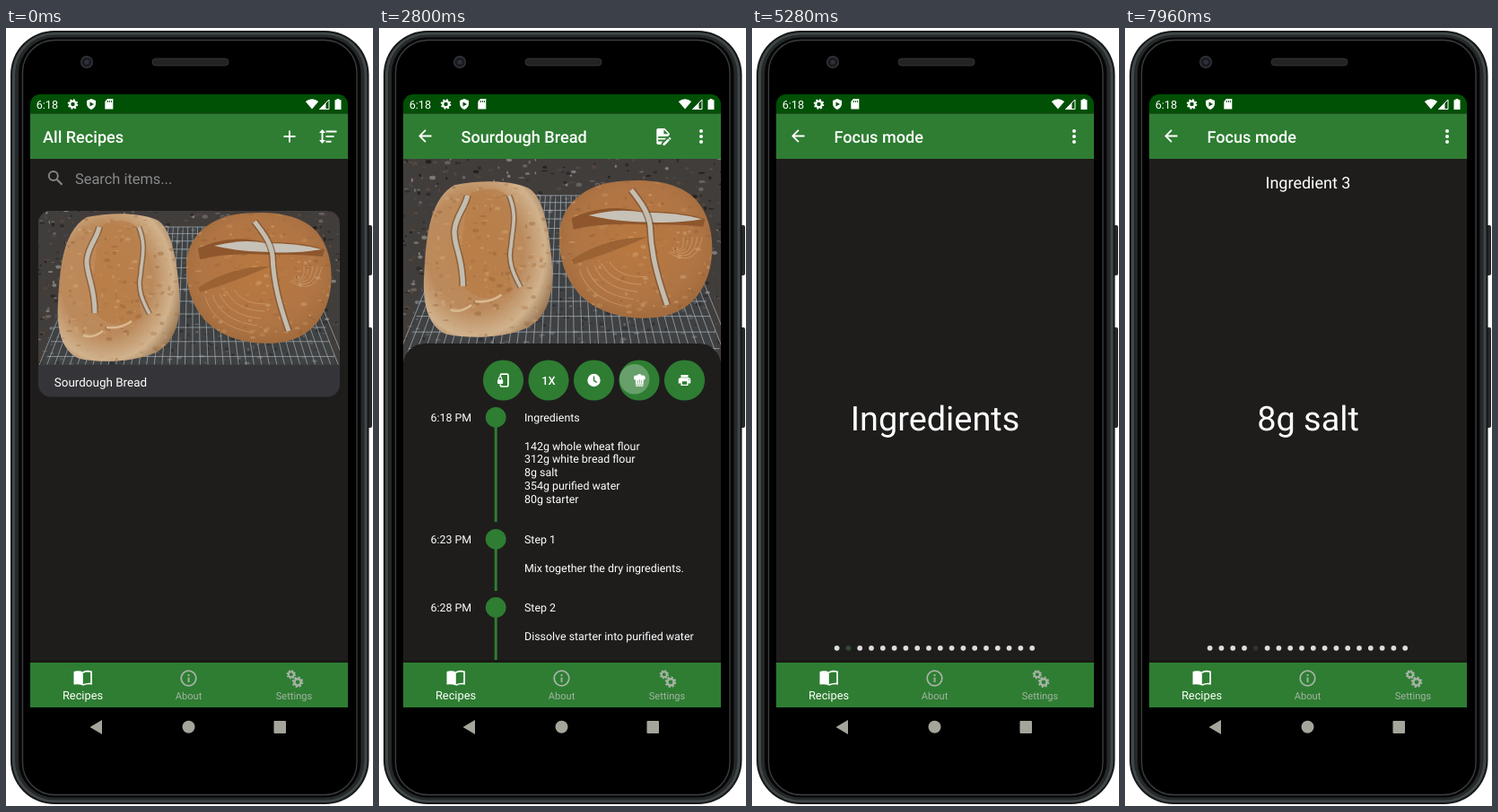
An HTML page that plays this animation: 409 px wide and 868 px high, repeating every 8 s.

```html
<!DOCTYPE html>
<html lang="en">
<head>
<meta charset="utf-8">
<title>Recipe app</title>
<style>
html, body { margin: 0; width: 100%; height: 100%; overflow: hidden; background: #fff; }
svg { display: block; width: 409px; height: 868px; font-family: Roboto, sans-serif; fill: #fff; }
text { text-rendering: geometricPrecision; white-space: pre; }
</style>
</head>
<body>
<svg id="stage" viewBox="0 0 409 868" xmlns="http://www.w3.org/2000/svg"></svg>
<script>
const LOOP = 8000, TICK = 66.9, PAGE_W = 328;
const GREEN = '#2e7d32', BODY = '#1e1d1c', MUTED = '#a5b3a5';

// Shape helpers
const attrs = o => Object.entries(o).map(([k, v]) => ` ${k}="${v}"`).join('');
const rect = (x, y, w, h, fill, rx = 0, more = {}) =>
  `<rect x="${x}" y="${y}" width="${w}" height="${h}" rx="${rx}" fill="${fill}"${attrs(more)}/>`;
const circle = (x, y, r, fill, more = {}) =>
  `<circle cx="${x}" cy="${y}" r="${r}" fill="${fill}"${attrs(more)}/>`;
const path = (d, fill = '#fff', more = {}) => `<path d="${d}" fill="${fill}"${attrs(more)}/>`;
const line = (d, color, w, more = {}) => path(d, 'none', { stroke: color, 'stroke-width': w, ...more });
const text = (x, y, size, str, more = {}) =>
  `<text x="${x}" y="${y}" font-size="${size}"${attrs(more)}>${str}</text>`;
const clipped = (id, body) => `<g clip-path="url(#${id})">${body}</g>`;
const mid = { 'text-anchor': 'middle' };
const bold = { 'font-weight': 500 };
const icon = (x, y, size, d) =>
  `<g transform="translate(${x - size / 2} ${y - size / 2}) scale(${size / 24})">${path(d, '#fff', { 'fill-rule': 'evenodd' })}</g>`;

function gear(x, y, r, color) {
  const tooth = Math.PI * 2 * r * 0.82 / 16;
  return circle(x, y, r * 0.58, 'none', { stroke: color, 'stroke-width': r * 0.4 }) +
    circle(x, y, r * 0.82, 'none', { stroke: color, 'stroke-width': r * 0.36, 'stroke-dasharray': tooth });
}

function seeded(seed) {
  return () => (seed = (seed * 16807) % 2147483647) / 2147483647;
}

const rnd = seeded(41);

// Random flecks inside a box
function flecks(n, x, y, w, h, size, tones, opacity) {
  let s = '';
  for (let i = 0; i < n; i++) {
    const f = v => v.toFixed(1);
    s += `<ellipse cx="${f(x + rnd() * w)}" cy="${f(y + rnd() * h)}" rx="${f(0.6 + rnd() * size)}" ry="${f(0.5 + rnd() * size * 0.6)}" fill="${tones[Math.floor(rnd() * tones.length)]}"/>`;
  }
  return `<g opacity="${opacity}">${s}</g>`;
}

const LOAF_A = 'M90 211C118 205 150 206 168 214C184 222 190 257 193 291C196 325 189 349 169 361C145 373 105 374 82 369C62 361 56 336 58 306C60 265 64 226 90 211Z';
const LOAF_B = 'M201 262C203 235 222 216 250 209C285 203 325 205 345 226C362 244 366 275 360 300C353 328 335 347 305 351C270 355 235 345 217 320C206 305 200 285 201 262Z';
const CRUST = ['#dcb488', '#c99762', '#8e5a30', '#a86f3e'];

// Two loaves on a cooling rack over a stone worktop
function photo() {
  let s = rect(30, 178, 350, 220, '#413d3b') +
    flecks(900, 30, 178, 346, 215, 2.8, ['#1c1a1a', '#2a2726', '#6f6a67', '#59493f', '#8c8987', '#46474b'], 0.8);
  s += path('M75 222L330 222L372 395L38 395Z', '#3c464f', { opacity: 0.4 });
  let grid = '';
  for (let i = 0; i <= 40; i++) grid += `M${100 + i * 5.4} 222L${28 + i * 9} 398`;
  for (let i = 0; i < 14; i++) {
    const y = 222 + i * 7 + i * i * 0.42;
    grid += `M${82 - (y - 222) * 0.25} ${y}H${325 + (y - 222) * 0.28}`;
  }
  s += line(grid, '#a9b3bb', 0.9, { opacity: 0.75 });

  const crack = (d, w) => line(d, '#6f4a2d', w + 3, { opacity: 0.6 }) + line(d, '#c3bdb0', w);
  s += path(LOAF_A, 'url(#loafA)');
  s += path('M106 221C122 211 144 214 148 226C151 255 143 292 152 322C138 334 114 334 101 320C96 290 98 250 106 221Z', '#b5793f', { opacity: 0.5 });
  s += clipped('clipA', flecks(260, 58, 208, 136, 164, 3, CRUST, 0.35));
  s += crack('M104 222C101 236 91 244 90 260C90 278 99 286 99 318', 5);
  s += crack('M148 222C157 244 151 258 150 275C146 292 153 306 160 319', 3.5);
  s += line('M86 343Q96 347 108 338M112 334Q128 336 140 327', '#d8b991', 2.5);

  s += path(LOAF_B, 'url(#loafB)');
  let rings = '';
  for (let i = 0; i < 5; i++) {
    rings += `M${222 + i * 8} ${300 - i * 2}Q${232 + i * 8} ${333 - i * 6} ${276 + i * 4} ${340 - i * 8}`;
    rings += `M${316 + i * 3} ${282 - i}Q${345 - i * 3} ${300 - i * 5} ${352 - i * 5} ${266}`;
  }
  s += line(rings, '#d6ae7e', 1, { opacity: 0.5 });
  s += clipped('clipB', flecks(260, 201, 206, 164, 146, 3, CRUST, 0.35));
  s += path('M214 246Q250 229 288 239Q329 238 355 247L353 255Q322 252 296 253Q250 250 216 258Z', '#8e562c');
  s += path('M232 243Q262 235 290 240Q326 240 352 247Q322 252 294 250Q262 250 232 243Z', '#c6c2b8');
  s += path('M214 290Q250 266 294 266Q262 280 216 295Z', '#9b6233');
  return s + crack('M277 216C288 230 295 240 297 254C298 286 306 312 315 338', 5);
}

function phone() {
  return rect(400, 220, 8, 56, '#26292a', 2) + rect(400, 334, 8, 112, '#26292a', 2) +
    rect(5, 3, 399.5, 863, '#151717', 49) + rect(7, 5, 395.5, 859, '#414748', 47) +
    rect(10, 7.5, 389.5, 854, '#25292a', 44) + rect(14, 10.5, 381.5, 848, '#060606', 40) +
    rect(18.5, 13.5, 372.5, 842, '#000', 36, { stroke: '#3c3f40', 'stroke-width': 1.3 }) +
    rect(163, 34, 85, 8, '#232323', 4, { stroke: '#3a3a3a', 'stroke-width': 0.8 }) +
    circle(90, 38, 6.3, '#1a1b1f', { stroke: '#34363a', 'stroke-width': 1.4 }) + circle(90, 38, 2.6, '#2d303a') +
    path('M93.5 780L107 772V788Z', '#a6a59b') + circle(203.5, 779.8, 7, '#a6a59b') + rect(298.5, 773, 13.5, 14, '#a6a59b', 1);
}

function statusBar() {
  return rect(27, 74, 354, 21.5, '#005005') + text(33.7, 89.7, 12.6, '6:18') +
    gear(74.5, 85, 5.8, '#fff') +
    path('M95 79L100 81V85Q99.500 89 95 91Q90.500 89 90 85V81Z') + path('M93.500 82.500L98 85L93.500 87.500Z', '#005005') +
    path('M113 79H119.300V90.500H110.300V82Z') + line('M113.500 81V83M115.500 81V83M117.500 81V83', '#005005', 0.9) +
    path('M341 90.500L333.800 82Q341 76.500 348.200 82Z') +
    path('M349.500 90.500L360 80V90.500Z', 'none', { stroke: '#fff', 'stroke-width': 1 }) + path('M349 91L356.500 83.500V91Z') +
    path('M368.500 79H371.500V80.200H373.500V91H366.500V80.200H368.500Z');
}

function tabBar() {
  return rect(27, 705.5, 354, 2.5, '#181716') + rect(27, 708, 354, 50, GREEN) +
    path('M75.500 718Q81 716.300 85.800 718.500V733.500Q81 731.500 75.500 732.500Z') +
    line('M85.800 719Q90 716.800 95 718.200V731.700Q90 731 85.800 733', '#fff', 1.7) +
    text(85.5, 749.2, 12.8, 'Recipes', mid) +
    circle(203.5, 725.5, 8.3, 'none', { stroke: MUTED, 'stroke-width': 1.8 }) +
    rect(202.6, 724.5, 1.9, 5.5, MUTED) + rect(202.6, 721, 1.9, 2, MUTED) +
    text(203.5, 749, 11.1, 'About', { ...mid, fill: MUTED }) +
    gear(317.8, 721.3, 5.2, MUTED) + gear(325, 729.8, 6.3, MUTED) +
    text(321, 749, 11.1, 'Settings', { ...mid, fill: MUTED });
}

const bar = (x, title) => rect(27, 95.5, 354, 50.5, GREEN) + text(x, 127.8, 18.1, title, bold);
const backBar = title => bar(91.5, title) +
  icon(51.3, 120.5, 21.6, 'M20 11H7.83l5.59-5.59L12 4l-8 8 8 8 1.41-1.41L7.83 13H20v-2z') +
  [115, 121, 127].map(y => circle(359, y, 2, '#fff')).join('');

function listScreen() {
  return rect(27, 95, 354, 613, BODY) + bar(41, 'All Recipes') +
    line('M309.500 121H322.500M316 114.500V127.500', '#fff', 1.9) +
    line('M352.500 115V127M356.500 115.500H368.500M356.500 121H365.500M356.500 126.700H362.500', '#fff', 1.9) +
    path('M349 117L352.500 113L356 117ZM349 125L352.500 129L356 125Z') +
    circle(52.8, 165, 5, 'none', { stroke: '#858585', 'stroke-width': 1.9 }) +
    line('M56.500 168.700L62.500 174.700', '#858585', 2.2) +
    text(77, 173.5, 16.4, 'Search items...', { fill: '#8a8a8a' }) +
    clipped('card', rect(36, 204, 336, 208, '#353438') + clipped('cardPhoto', '<use href="#photo"/>')) +
    text(53.8, 399.6, 13.45, 'Sourdough Bread');
}

function detailScreen() {
  const size = 12.42;
  const step = (y, end, time, title, lines) =>
    rect(128.7, y, 3, end - y, GREEN) + circle(130.2, y, 11.4, GREEN) +
    text(57.5, y + 4.5, size, time) + text(162, y + 4.5, size, title) +
    lines.map((s, i) => text(162, y + 36.3 + i * 14.79, size, s)).join('');
  const buttons = [138.5, 189, 239.5, 290, 340.5].map(x => circle(x, 393, 22.6, GREEN)).join('');
  return rect(27, 95, 354, 613, BODY) +
    clipped('hero', '<use href="#photo" transform="translate(-10.9 -47.1) scale(1.054)"/>') +
    path('M27 376A24 24 0 0 1 51 352H357A24 24 0 0 1 381 376V708H27Z', BODY) + backBar('Sourdough Bread') +
    icon(316.5, 121, 21.6, 'M6 2C4.9 2 4 2.9 4 4V20A2 2 0 0 0 6 22H10V20.1L12.100 18H6V16H14.100L16.100 14H6V12H18.100L20 10.100V8L14 2H6M13 3.500L18.500 9H13V3.500M20.150 13C20 13 19.860 13.050 19.750 13.160L18.730 14.180L20.820 16.260L21.840 15.250C22.050 15.030 22.050 14.670 21.840 14.460L20.540 13.160C20.430 13.050 20.290 13 20.150 13M18.140 14.770L12 20.920V23H14.080L20.230 16.860Z') +
    buttons +
    rect(135.3, 386.2, 8.6, 13.8, 'none', 1.4, { stroke: '#fff', 'stroke-width': 1.7 }) +
    rect(131.3, 390, 7.6, 7.4, GREEN) + rect(132, 392.3, 6.2, 4.7, '#fff', 0.8) +
    line('M133.500 392.500V391A1.600 1.600 0 0 1 136.700 391V392.500', '#fff', 1.1) +
    text(189, 397.7, 12.8, '1X', { ...mid, ...bold }) +
    circle(239.5, 393, 7.2, '#fff') + line('M239.500 388.500V393.300L242.800 395.300', GREEN, 1.4) +
    icon(290, 393, 16.2, 'M12.500 1.500C10.730 1.500 9.170 2.670 8.670 4.370C8.140 4.130 7.580 4 7 4A4 4 0 0 0 3 8C3 9.820 4.240 11.410 6 11.870V19H19V11.870C20.760 11.410 22 9.820 22 8A4 4 0 0 0 18 4C17.420 4 16.860 4.130 16.330 4.370C15.830 2.670 14.270 1.500 12.500 1.500M12 10.500H13V17.500H12V10.500M9 12.500H10V17.500H9V12.500M15 12.500H16V17.500H15V12.500M6 20V21A1 1 0 0 0 7 22H18A1 1 0 0 0 19 21V20Z') +
    icon(340.5, 393, 16.2, 'M19 8H5c-1.660 0-3 1.340-3 3v6h4v4h12v-4h4v-6c0-1.660-1.340-3-3-3zm-3 11H8v-5h8v5zm3-7c-.550 0-1-.450-1-1s.450-1 1-1 1 .450 1 1-.450 1-1 1zm-1-9H6v4h12V3z') +
    step(434.3, 551, '6:18 PM', 'Ingredients', ['142g whole wheat flour', '312g white bread flour', '8g salt', '354g purified water', '80g starter']) +
    step(570.3, 628, '6:23 PM', 'Step 1', ['Mix together the dry ingredients.']) +
    step(646.5, 705, '6:28 PM', 'Step 2', ['Dissolve starter into purified water']);
}

// Focus mode pages: heading, text lines, settled dot colour
const pages = [
  ['', ['Sourdough Bread'], '#2e5a30'],
  ['', ['Ingredients'], '#30492f'],
  ['Ingredient 1', ['142g whole wheat', 'flour'], '#2e5a30'],
  ['Ingredient 2', ['312g white bread', 'flour'], '#2e5a30'],
  ['Ingredient 3', ['8g salt'], '#303030']
];
const DOTS = 18;

function focusScreen() {
  const page = ([head, lines], i) => {
    const x = 204 + i * PAGE_W;
    return text(x, 179, 18.03, head, mid) +
      lines.map((s, k) => text(x, 449.2 + (k - (lines.length - 1) / 2) * 44.4, 37.86, s, mid)).join('');
  };
  let dots = '';
  for (let i = 0; i < DOTS; i++) dots += circle(94.6 + i * 12.8, 691.8, 2.9, '#dcdcdc');
  return rect(27, 95, 354, 613, BODY) + backBar('Focus mode') +
    clipped('pager', `<g id="track">${pages.map(page).join('')}</g>`) + `<g id="dots">${dots}</g>`;
}

const clip = (id, shape) => `<clipPath id="${id}">${shape}</clipPath>`;
const grad = (id, cx, stops) => `<radialGradient id="${id}" cx="${cx}" cy=".45" r=".68">` +
  stops.map(([o, c]) => `<stop offset="${o}" stop-color="${c}"/>`).join('') + '</radialGradient>';

document.getElementById('stage').innerHTML = '<defs>' +
  grad('loafA', 0.4, [[0, '#bf8653'], [0.55, '#bb8a5c'], [0.8, '#d0b28d'], [1, '#8f6b49']]) +
  grad('loafB', 0.5, [[0, '#b9783f'], [0.6, '#b07545'], [0.85, '#a06a3c'], [1, '#6e4626']]) +
  clip('screen', '<path d="M27 85A11 11 0 0 1 38 74H370A11 11 0 0 1 381 85V758H27Z"/>') +
  clip('card', rect(36, 204, 336, 207.5, '#fff', 14)) +
  clip('cardPhoto', rect(36, 204, 336, 171.5, '#fff')) +
  clip('hero', rect(27, 146, 354, 234, '#fff')) +
  clip('pager', rect(40, 146, PAGE_W, 530, '#fff')) +
  clip('clipA', path(LOAF_A)) + clip('clipB', path(LOAF_B)) +
  `<g id="photo">${photo()}</g></defs>` + phone() +
  clipped('screen', `${statusBar()}<g id="list">${listScreen()}</g>` +
    `<g id="detail">${detailScreen()}</g><g id="focus">${focusScreen()}</g>${tabBar()}` +
    circle(0, 0, 0, '#fff', { id: 'tap' }));

const el = id => document.getElementById(id);
const list = el('list'), detail = el('detail'), focus = el('focus'), track = el('track'), tap = el('tap');
const dots = [...el('dots').children];

const ramp = (t, a, b) => Math.min(1, Math.max(0, (t - a) / (b - a)));
const ease = u => u < 0.5 ? 4 * u ** 3 : 1 - 4 * (1 - u) ** 3;
const swipes = [[4815, 5285], [5818, 6288], [6755, 7157], [7560, 7960]];
const taps = [[716, 166.5, 301.5], [2790, 284.7, 391.8]];

function fade(node, v) {
  node.setAttribute('opacity', v);
  node.setAttribute('display', v > 0 ? 'inline' : 'none');
}

function draw(time) {
  const t = Math.floor((time + 18) / TICK) * TICK;

  const toDetail = ramp(t, 1460, 1535), toFocus = ramp(t, 3750, 3805);
  fade(list, toDetail < 1 ? 1 : 0);
  fade(detail, toFocus < 1 ? toDetail : 0);
  fade(focus, toFocus);

  const pos = swipes.reduce((sum, [a, b]) => sum + ease(ramp(t, a, b)), 0);
  track.setAttribute('transform', `translate(${-pos * PAGE_W} 0)`);
  const active = Math.round(pos), moving = Math.abs(pos - active) > 1e-6;
  dots.forEach((d, i) => d.setAttribute('fill', i !== active ? '#dcdcdc' : moving ? GREEN : pages[i][2]));

  const hit = taps.find(([a]) => t >= a && t < a + 215);
  fade(tap, 0);
  if (hit) {
    const u = (t - hit[0]) / 215;
    tap.setAttribute('cx', hit[1]);
    tap.setAttribute('cy', hit[2]);
    tap.setAttribute('r', 35 * Math.min(1, 0.4 + 0.85 * u));
    fade(tap, 0.3 * (1 - u));
  }
}

function loop() {
  draw(performance.now() % LOOP);
  requestAnimationFrame(loop);
}
loop();
</script>
</body>
</html>
```
